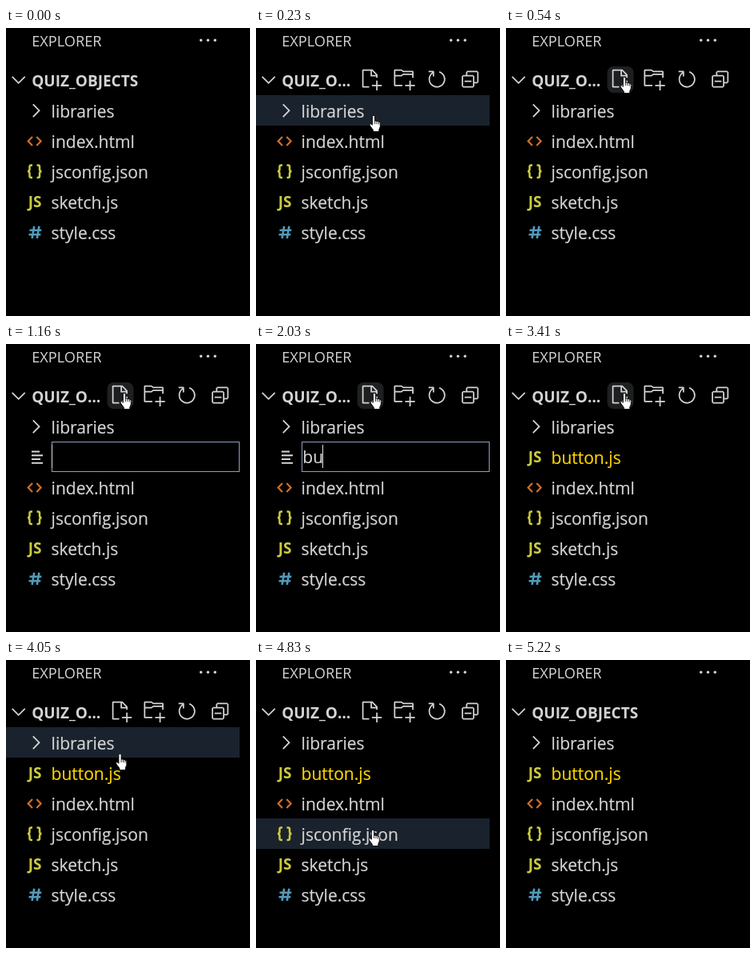
Write an HTML page that moves like this. It is 305 px wide and 360 px high and loops after 5.44 s.

```html
<!DOCTYPE html>
<html lang="en">
<head>
<meta charset="utf-8">
<title>Explorer</title>
<style>
  html, body { margin: 0; width: 100%; height: 100%; overflow: hidden; background: #000; }
  svg { display: block; width: 305px; height: 360px; }
  text { font: 21px "Open Sans", "Noto Sans", sans-serif; fill: #d4d4d4; white-space: pre; }
  .name { stroke: #d4d4d4; stroke-width: .2; }
  .new { fill: #ffd500; stroke: #ffd500; }
  .title { font-size: 18.2px; }
  .folder { font-size: 19px; font-weight: 700; }
  .error { font-size: 19.6px; }
  .js { font-size: 19px; font-weight: 700; fill: #cbcb41; }
  .line { fill: none; stroke: #d4d4d4; stroke-width: 1.8; }
</style>
</head>
<body>
<svg id="stage" viewBox="0 0 305 360"></svg>
<script>
const LOOP = 5440;
const ROW = 38, TOP = 84, LIST_W = 292;
const stage = document.getElementById('stage');
const pen = document.createElement('canvas').getContext('2d');
pen.font = '21px "Open Sans", "Noto Sans", sans-serif';

// Pointer tip: start time, x, y; no position means outside the panel
const POINTER = [
  [0], [70, 146, 271], [150, 147, 180], [230, 147, 109],
  [380, 148, 90], [460, 148, 70], [540, 148, 61],
  [3970, 146, 84], [4050, 142.5, 117], [4130, 141.5, 128],
  [4200, 141, 132], [4270, 141, 134], [4350, 141, 135],
  [4830, 146, 212], [4910]
];
const TYPED = [
  [0, ''], [1870, 'b'], [2030, 'bu'], [2180, 'but'], [2260, 'butt'],
  [2410, 'button'], [2720, 'button.'], [2880, 'button.j'], [3040, 'button.js']
];
const FILES = [
  ['folder', 'libraries'], ['html', 'index.html'], ['json', 'jsconfig.json'],
  ['js', 'sketch.js'], ['css', 'style.css']
];
const ERROR = [
  'The name <tspan font-weight="700">button.</tspan> is',
  'not valid as a file or', 'folder name. Please',
  'choose a different', 'name.'
];

const at = (keys, t) => keys.filter(k => k[0] <= t).pop();
const during = (t, from, to) => t >= from && t < to;
const text = (x, y, s, cls) => `<text x="${x}" y="${y}" class="${cls}">${s}</text>`;
const rect = (x, y, w, h, attrs) =>
  `<rect x="${x}" y="${y}" width="${w}" height="${h}" ${attrs}/>`;
const stroke = (d, color, width) =>
  `<path d="${d}" fill="none" stroke="${color}" stroke-width="${width}"/>`;

// Row icons, relative to the top of the row
const ICONS = {
  folder: '<path class="line" d="M33.8 11.3l7.7 7.9-7.7 7.9"/>',
  html: stroke('M33 14l-5.3 5.5 5.3 5.5M38.3 14l5.3 5.5-5.3 5.5', '#d06f2c', 2.2),
  json: stroke('M33 11.5h-1.5q-2 0-2 2v3q0 2.7-2.5 2.7 2.5 0 2.5 2.7v3q0 2 2 2H33' +
    'M38.5 11.5h1.5q2 0 2 2v3q0 2.7 2.5 2.7-2.5 0-2.5 2.7v3q0 2-2 2h-1.5', '#cbcb41', 2.5),
  js: text(27.8, 25.5, 'JS', 'js'),
  css: stroke('M35.2 11.8l-2.6 15.2M41.4 11.8l-2.6 15.2M29.5 16.7h14.8M28.5 22.2h14.8', '#519aba', 2.6),
  plain: stroke('M32 12.5h10M32 17.2h14M32 22h11M32 26.7h14', '#d4d7d6', 1.9)
};

// Toolbar icons on a 16 unit grid
const PLUS = 'M13 16h-1v-3H9v-1h3V9h1v3h3v1h-3z';
const TOOLS = [
  'M9.5 1.1l3.4 3.5.1.4v2h-1V6H8V2H3v11h4v1H2.5l-.5-.5v-12l.5-.5h6.7zM9 2v3h2.9z' + PLUS,
  'M14.5 2H7.7L6.5 1h-5l-.5.5v11l.5.5H7v-1H2V6h4.5l1.2-1H14v2h1V2.5zM14 4H7.5L6.3 5H2V2h4.3l1.2 1H14z' + PLUS,
  'M4.7 3H2V2h3.5l.5.5V6H5V4a5 5 0 1 0 4.53-.76l.3-.95A6 6 0 1 1 4.7 3z',
  'M9 9H4v1h5zM5 3l1-1h7l1 1v7l-1 1h-2v2l-1 1H3l-1-1V6l1-1h2zm1 2h4l1 1v4h2V3H6zm4 1H3v7h7z'
];

const HAND = '<path d="M-1.6 1.8q0-1.5 1.6-1.5t1.6 1.5v5.4q1.5-.7 2.4.5 1.5-.6 2.3.7 1.9-.4 2 1.5' +
  'v4.4l-1.5 3.6v2.6H-.6v-2L-4.6 13q-.9-1.8.4-2.3 1.2-.3 2.6 1.6z" fill="#fff" stroke="#000" stroke-width=".9"/>' +
  stroke('M1.6 7v4M4 7.8v3.4M6.3 8.5v3', '#000', .8);

function toolbar(iconHover) {
  return (iconHover ? rect(126.5, 48, 33, 33, 'rx="8" fill="#1e1f20"') : '') +
    TOOLS.map((d, i) => `<path transform="translate(${129.2 + i * 41.5} 50) scale(1.75)" ` +
      `d="${d}" fill="#d4d4d4" fill-rule="evenodd"/>`).join('');
}

function row([icon, name], i, isNew) {
  return `<g transform="translate(0 ${TOP + i * ROW})">${ICONS[icon]}` +
    text(56.6, 28, name, isNew ? 'name new' : 'name') + '</g>';
}

function inputBox(t) {
  const value = at(TYPED, t)[1];
  const invalid = during(t, 2720, 2880);
  const caret = t >= 1160 && !during(t, 1630, 1870);
  const x = 58.3 + pen.measureText(value).width;
  let out = rect(57.5, 122.5, 234, 37, `fill="#000" stroke="${invalid ? '#be1100' : '#8f9fbf'}"`) +
    text(58.3, 149, value, 'name');
  if (caret) out += rect(Math.floor(x - .4), 126, 1, 29, 'fill="#ddd"');
  if (invalid) {
    out += rect(57.5, 158.5, 234, 165, 'fill="#5a1d1d" stroke="#be1100"') +
      ERROR.map((s, i) => text(66.5, 191 + i * 29.2, s, 'error')).join('');
  }
  return out;
}

function scene(t) {
  const [, px, py] = at(POINTER, t);
  const inside = px !== undefined;
  const editing = during(t, 1080, 3270);
  const created = t >= 3340;
  const open = during(t, 70, 5220);

  const rows = FILES.slice();
  if (editing) rows.splice(1, 0, [t >= 3040 ? 'js' : 'plain', '']);
  if (created) rows.splice(1, 0, ['js', 'button.js']);

  const hover = inside ? Math.floor((py - TOP) / ROW) : -1;
  const lit = hover >= 0 && hover < rows.length && !(created && hover === 1);

  let out = text(32.2, 23, 'EXPLORER', 'title') +
    [243.7, 252.5, 261.3].map(x => `<circle cx="${x}" cy="15.2" r="1.7" fill="#d4d4d4"/>`).join('') +
    '<path class="line" d="M7.7 60.8l8 8 8-8"/>' +
    text(32.2, 73, open ? 'QUIZ_O…' : 'QUIZ_OBJECTS', 'folder');
  if (open) out += toolbar(inside && py > 48 && py < 81);
  if (lit) out += rect(0, TOP + hover * ROW, LIST_W, ROW, 'fill="#1a232d"');
  out += rows.map((r, i) => row(r, i, created && i === 1)).join('');
  if (editing) out += inputBox(t);
  if (during(t, 3270, 3410)) {
    out += rect(.5, TOP + .5, LIST_W - 1, 275, 'fill="none" stroke="#8f9fbf"');
  }
  if (inside) out += `<g transform="translate(${px} ${py})">${HAND}</g>`;
  return out;
}

let shown = '';
const start = performance.now();
function draw() {
  const next = scene((performance.now() - start) % LOOP);
  if (next !== shown) stage.innerHTML = shown = next;
  requestAnimationFrame(draw);
}
draw();
</script>
</body>
</html>
```
